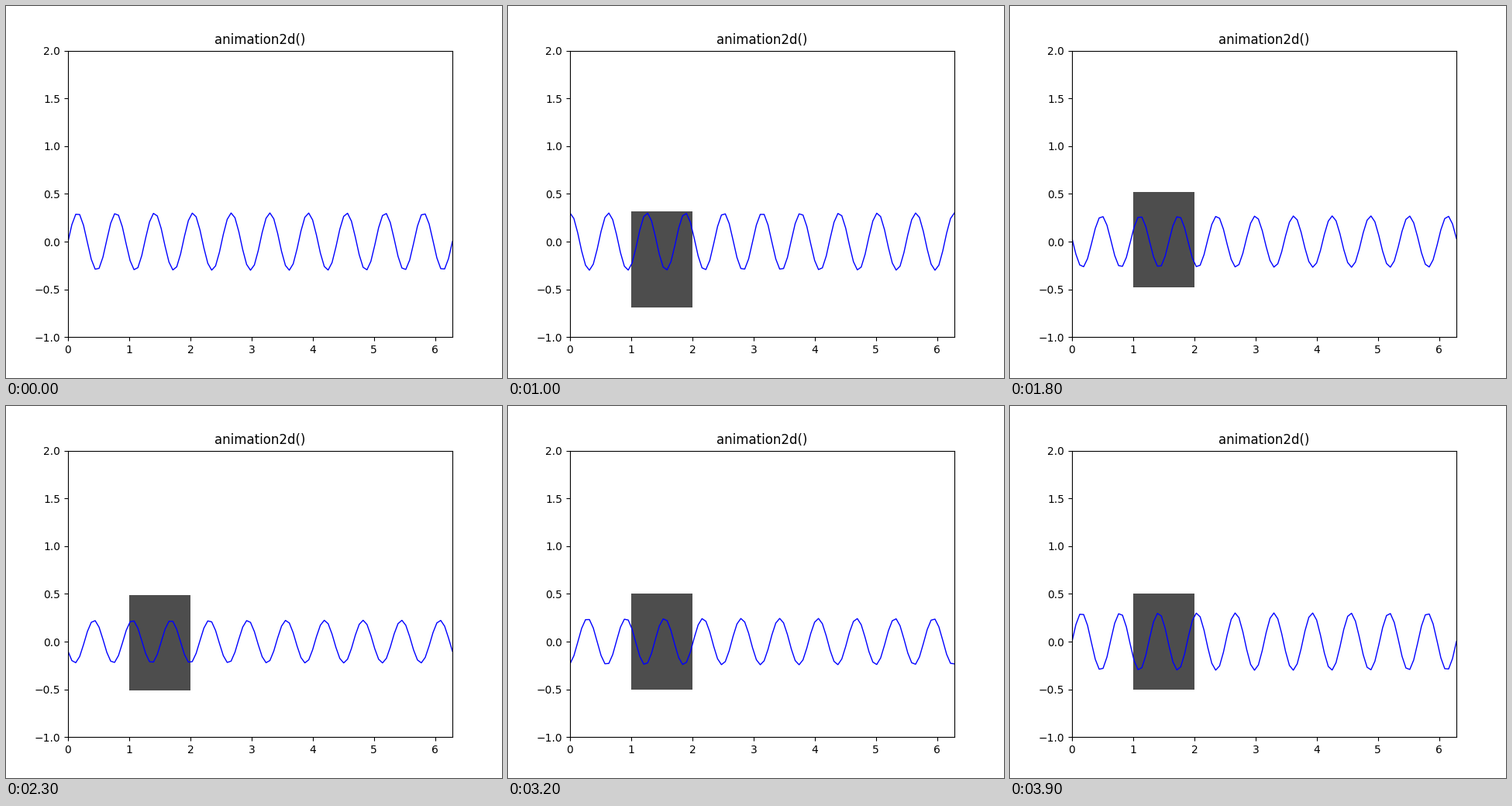
Recreate the animation shown at these times as a matplotlib script. Size 640 by 480 pixels, loop 4000 ms.

```python
import numpy as np
import matplotlib.pyplot as plt
from matplotlib.animation import FuncAnimation
from matplotlib.patches import Rectangle

FRAMES = 40
INTERVAL = 100
STEPS = 10           # frames per blend between two waves
START, REST = 2.0, -0.5
OMEGA, ZETA = 0.5, 0.5

plt.rcParams["font.family"] = "DejaVu Sans"

x = np.linspace(0, 2 * np.pi, 100)
sine, cosine = 0.3 * np.sin(10 * x), 0.3 * np.cos(10 * x)
waves = [sine, cosine, -sine, -cosine, sine]


def wave(i):
    """Linear blend from one key wave to the next, both ends included."""
    k, step = divmod(i, STEPS)
    t = step / (STEPS - 1)
    return (1 - t) * waves[k] + t * waves[k + 1]


def spring(i):
    """Height of an underdamped spring released from START."""
    root = np.sqrt(1 - ZETA ** 2)
    angle = OMEGA * root * i
    decay = np.exp(-ZETA * OMEGA * i)
    swing = np.cos(angle) + ZETA / root * np.sin(angle)
    return REST + (START - REST) * decay * swing


fig, ax = plt.subplots(figsize=(6.4, 4.8), dpi=100)
ax.set_xlim(0, 2 * np.pi)
ax.set_ylim(-1, 2)
ax.set_title("animation2d()")
box = ax.add_patch(Rectangle((1, START), 1, 1, facecolor="0.3", linewidth=0))
line, = ax.plot(x, sine, color="blue", linewidth=1)


def update(i):
    line.set_ydata(wave(i))
    box.set_y(spring(i))
    return box, line


anim = FuncAnimation(fig, update, frames=FRAMES, interval=INTERVAL,
                     repeat=True, repeat_delay=0)
plt.show()
```
